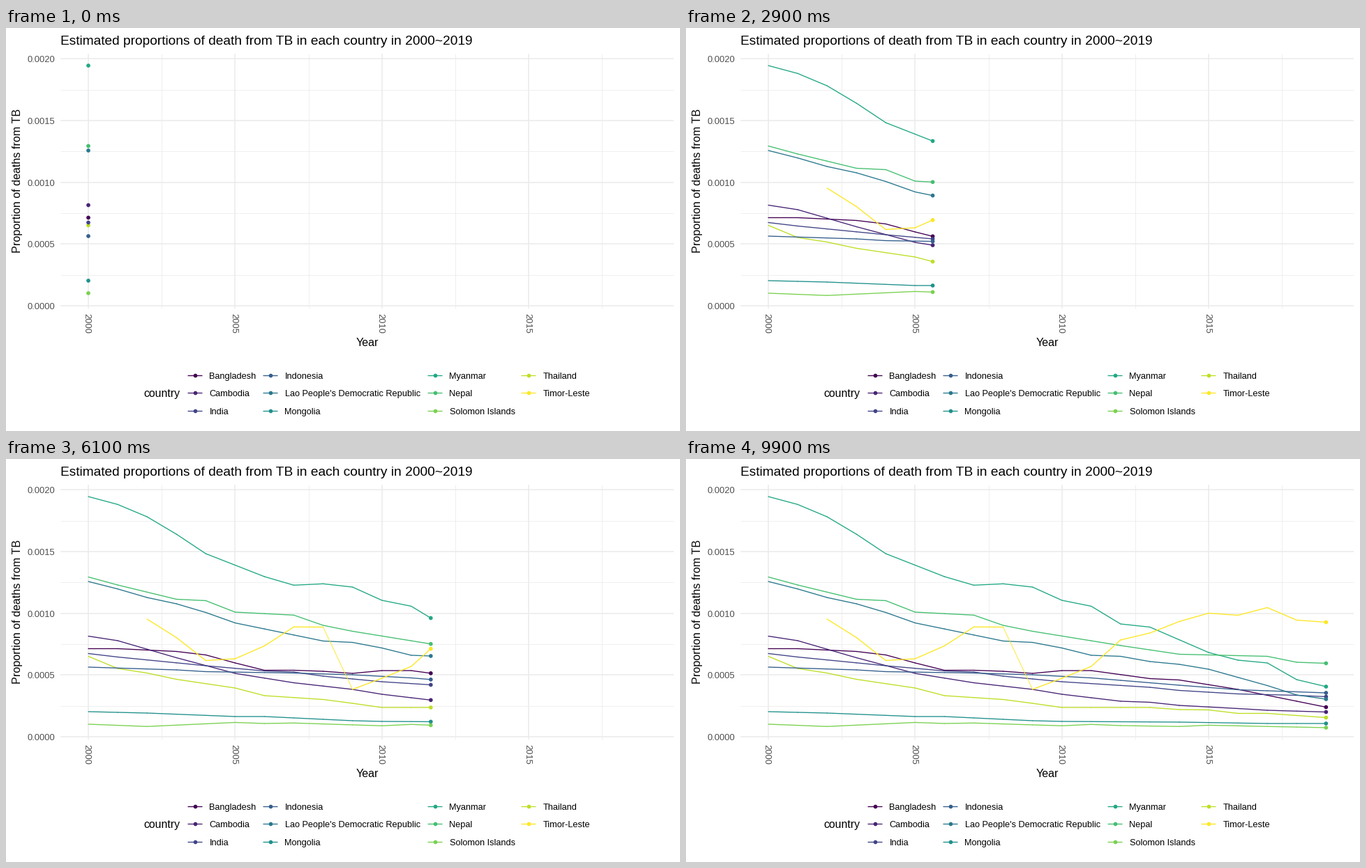
Animation, 966 px wide and 579 px high, one loop 10 s. Source, as a matplotlib script:

```python
import numpy as np
import matplotlib.pyplot as plt
from matplotlib.animation import FuncAnimation
from matplotlib.collections import LineCollection

W, H, DPI = 966, 579, 100
FRAMES, YEARS = 100, 20
LEFT, RIGHT, TOP, BOTTOM = 78, 957.3, 37, 402.8
X0, DX = 118, 42.07            # x of 2000, pixels per year
Y0, DY = 399.2, 88.75          # y of zero, pixels per 0.0005
LINE_W, DOT = 1.35, 5.7
_ = np.nan                     # year on a straight line between its neighbours

# Height on the stage for each year from 2000 to 2019
LEVELS = {
    "Bangladesh": [272.5, 272.5, _, 276.5, 281.5, 293, 303.5, 303.5, 305, 308,
                   304, 304, _, 315.5, 317.5, _, 331, _, _, 356.5],
    "Cambodia": [254.5, 261, _, 285.5, _, 308, _, 321.5, _, 331,
                 338, _, 348, 349.5, 354, _, 358.5, 361, _, 363.5],
    "India": [279.5, 284.5, _, _, 297, _, 304.5, 306, 312, _,
              320, _, _, 328, 332.5, _, 337.5, _, 339.5, 341.5],
    "Indonesia": [299, _, _, 303, 305.5, _, _, 307.5, _, 310,
                  _, 314.5, _, _, 325, _, 331.5, _, _, 336],
    "Lao People's Democratic Republic": [
        176, 186.7, 199, 208, 220.5, 235.5, _, _, 261.5, 263.5,
        271.5, 282, 283.5, 291, 295, 302, _, 325.5, 339, 345],
    "Mongolia": [363, _, 365, _, _, 370, 370, _, _, 376,
                 377, _, _, _, 378, _, _, 380, _, 380],
    "Myanmar": [54, 65.3, 83, 108, 136, _, 169, 181.3, 179.3, 184,
                203, 211.5, 237, 241.5, _, 278, 289, 293, 317, 327],
    "Nepal": [169.5, 181, _, 201.5, 203.5, 220, _, 224.3, 239, 247.5,
              _, _, 268, _, 280.5, _, _, 283.5, 292, 293.5],
    "Solomon Islands": [381, _, 384.3, _, _, 378.5, 380, 379.3, _, _,
                        383.3, 381.3, 383, _, 384.3, 382.5, _, _, _, 386],
    "Thailand": [283.5, 301, 307.5, 316.5, _, 329, 340, _, 345.5, 351,
                 357, _, _, 357, 360, 360.5, 365.5, 365.5, _, 371.5],
    "Timor-Leste": [_, _, 230, 256.5, 289.5, 287, 268.5, 241.3, 241.5, 331,
                    315, 298, 260, 250, 233.5, 221.5, 224.5, 213.5, 231.5, 234.5],
}


def px(n):
    """Pixels to points."""
    return n * 72 / DPI


def fill(levels):
    """First year with data, and the levels from there on without gaps."""
    levels = np.array(levels, float)
    known = np.flatnonzero(~np.isnan(levels))
    years = np.arange(known[0], YEARS)
    return known[0], np.interp(years, known, levels[known])


colors = dict(zip(LEVELS, plt.cm.viridis(np.linspace(0, 1, len(LEVELS)))))
# Thailand lies beneath the others
stack = sorted(LEVELS, key=lambda name: name != "Thailand")
series = [(*fill(LEVELS[name]), colors[name]) for name in stack]
# Each year starts on a whole frame
year_frames = np.round(np.arange(YEARS) * (FRAMES - 1) / (YEARS - 1))

plt.rcParams["font.family"] = "Liberation Sans"
fig = plt.figure(figsize=(W / DPI, H / DPI), dpi=DPI, facecolor="white")
ax = fig.add_axes([0, 0, 1, 1])
ax.set(xlim=(0, W), ylim=(H, 0))
ax.axis("off")


def label(x, y, text, size, color="black", **kw):
    ax.text(x, y, text, fontsize=px(size), color=color, va="baseline",
            rotation_mode="anchor", **kw)


def grid(x, y, width):
    ax.plot(x, y, color="#ebebeb", lw=px(width), solid_capstyle="butt", zorder=0)


def draw_axes():
    for i in range(9):
        y = Y0 - i * DY / 2
        grid([LEFT, RIGHT], [y, y], 0.8 if i % 2 else 1.5)
        if i % 2 == 0:
            label(70.5, y + 4.9, f"{i * 0.00025:.4f}", 12.9, "#4d4d4d", ha="right")
    for i in range(8):
        x = X0 + i * 2.5 * DX
        grid([x, x], [TOP, BOTTOM], 0.8 if i % 2 else 1.5)
        if i % 2 == 0:
            label(x - 5.2, 410, str(2000 + i * 5 // 2), 12.9, "#4d4d4d", rotation=-90)
    label(78, 24, "Estimated proportions of death from TB in each country in 2000~2019", 19.1)
    label(517.5, 457, "Year", 16.1, ha="center")
    label(21, 219.5, "Proportion of deaths from TB", 16.1, ha="center", rotation=90)


def draw_legend():
    label(197, 530, "country", 15.9)
    columns = [270.5, 378.5, 614.5, 748.5]
    for i, (name, color) in enumerate(colors.items()):
        x, y = columns[i // 3], 498.5 + i % 3 * 25.6
        ax.plot([x - 10.3, x + 10.3], [y, y], color=color, lw=px(LINE_W),
                solid_capstyle="butt")
        ax.plot(x, y, "o", color=color, ms=px(DOT), mew=0)
        label(x + 21, y + 5.1, name, 12.75)


draw_axes()
draw_legend()
lines = ax.add_collection(LineCollection([], capstyle="round", snap=False, zorder=3))
dots = ax.scatter([], [], s=px(DOT) ** 2, linewidths=0, snap=False, zorder=4)


def update(frame):
    now = np.interp(frame, year_frames, np.arange(YEARS))
    segments, widths, seg_colors, heads, head_colors = [], [], [], [], []
    for start, levels, color in series:
        if now < start:
            continue
        years = np.append(np.arange(start, np.ceil(now)), now)
        y = np.interp(years, np.arange(start, YEARS), levels)
        points = np.column_stack([X0 + years * DX, y])
        for a, b in zip(points, points[1:]):
            dx, dy = abs(b - a)
            segments.append([a, b])
            widths.append(px(0.9 if dy > dx else LINE_W))  # steep strokes are thinner
            seg_colors.append(color)
        heads.append(points[-1])
        head_colors.append(color)
    lines.set_segments(segments)
    lines.set_linewidths(widths or [1])
    lines.set_colors(seg_colors)
    dots.set_offsets(heads)
    dots.set_facecolors(head_colors)
    return lines, dots


anim = FuncAnimation(fig, update, frames=FRAMES, interval=100, repeat=True,
                     repeat_delay=0, blit=False)
plt.show()
```
